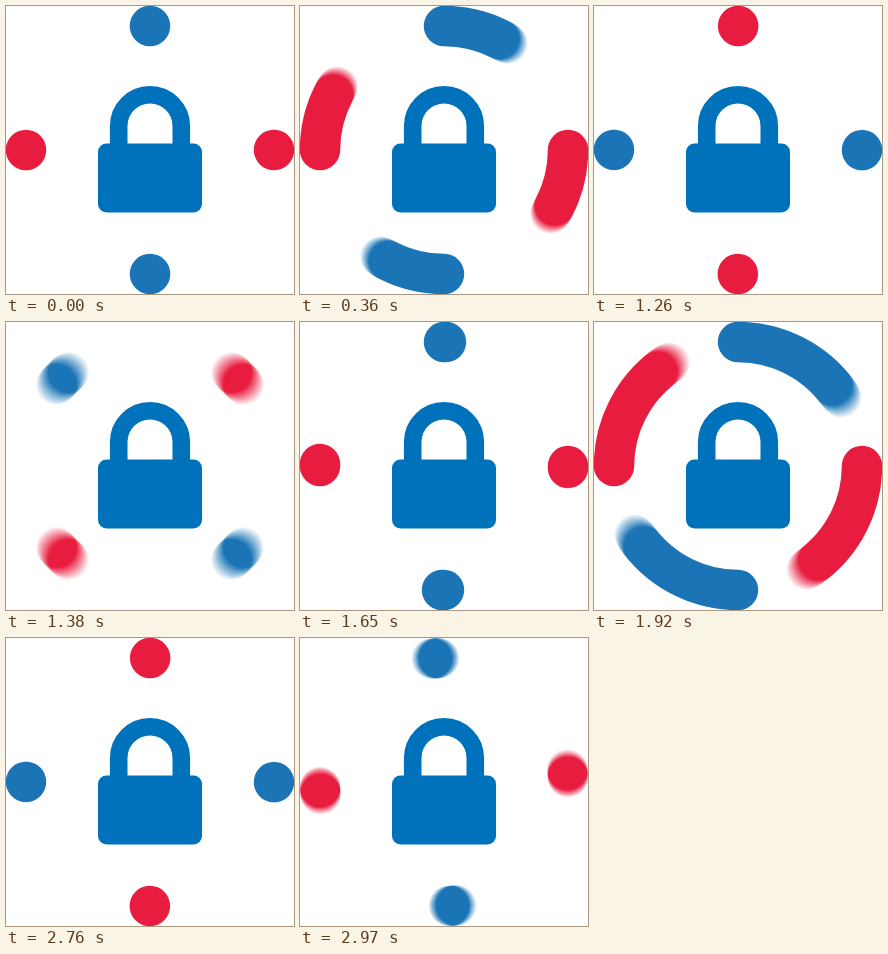
Animation, 288 px wide and 288 px high, one loop 3 s. Source, as an HTML page with a canvas:

```html
<!DOCTYPE html>
<html lang="en">
<head>
<meta charset="utf-8">
<title>Lock loader</title>
<style>
  html, body { margin: 0; width: 100%; height: 100%; overflow: hidden; background: #fff; }
  canvas, svg { position: absolute; left: 0; top: 0; width: 288px; height: 288px; }
</style>
</head>
<body>
<canvas id="ring"></canvas>
<svg viewBox="0 0 288 288">
  <path d="M112.7 142V120a31.3 31.3 0 0 1 62.6 0V142" fill="none" stroke="#0072bc" stroke-width="17.6"/>
  <rect x="92" y="137.5" width="104" height="69" rx="8.5" fill="#0072bc"/>
</svg>
<script>
  const SIZE = 288, MID = 144, RADIUS = 124, DOT = 40.4;
  const CYCLE = 1500, STEP = 30;
  const STRETCH = 480, SHRINK = 960, TURN = 1260;
  const SHUTTER = 15, SAMPLES = 15;
  const QUARTER = Math.PI / 2;
  const BLUE = '#1a74b5', RED = '#e71c3e';

  const scale = window.devicePixelRatio || 1;
  const setUp = canvas => {
    canvas.width = canvas.height = Math.round(SIZE * scale);
    const c = canvas.getContext('2d');
    c.scale(scale, scale);
    return c;
  };
  const ctx = setUp(document.getElementById('ring'));
  const buf = setUp(document.createElement('canvas'));
  buf.lineCap = 'round';
  buf.lineWidth = DOT;

  const smooth = u => u * u * (3 - 2 * u);

  // Tail and head of an arc, in quarter turns.
  function pose(time) {
    const p = (time + CYCLE) % CYCLE;
    if (p < STRETCH) return [0, (p / STRETCH) ** 4];
    if (p < SHRINK) return [1 - ((SHRINK - p) / (SHRINK - STRETCH)) ** 4, 1];
    if (p < TURN) return [1, 1];
    const turn = 1 + smooth((p - TURN) / (CYCLE - TURN));
    return [turn, turn];
  }

  // Average the poses over the open shutter as a mask, then tint it.
  function drawPair(color, start, poses) {
    buf.globalCompositeOperation = 'source-over';
    buf.clearRect(0, 0, SIZE, SIZE);
    buf.globalCompositeOperation = 'lighter';
    buf.globalAlpha = 1 / SAMPLES;
    for (const [tail, head] of poses) {
      for (const side of [0, 2]) {
        const base = start + side;
        buf.beginPath();
        buf.arc(MID, MID, RADIUS, (base + tail) * QUARTER, (base + head) * QUARTER + 0.001);
        buf.stroke();
      }
    }
    buf.globalAlpha = 1;
    buf.globalCompositeOperation = 'source-in';
    buf.fillStyle = color;
    buf.fillRect(0, 0, SIZE, SIZE);
    ctx.drawImage(buf.canvas, 0, 0, SIZE, SIZE);
  }

  function draw(time) {
    const poses = Array.from({ length: SAMPLES }, (_, i) =>
      pose(time + SHUTTER * ((i + 0.5) / SAMPLES - 0.5)));
    ctx.clearRect(0, 0, SIZE, SIZE);
    drawPair(BLUE, -1, poses);
    drawPair(RED, 0, poses);
  }

  const begin = performance.now();
  let last = -1;
  function tick() {
    const elapsed = Math.max(0, performance.now() - begin);
    const time = Math.floor(elapsed / STEP) * STEP % CYCLE;
    if (time !== last) draw(last = time);
    requestAnimationFrame(tick);
  }
  tick();
</script>
</body>
</html>
```
